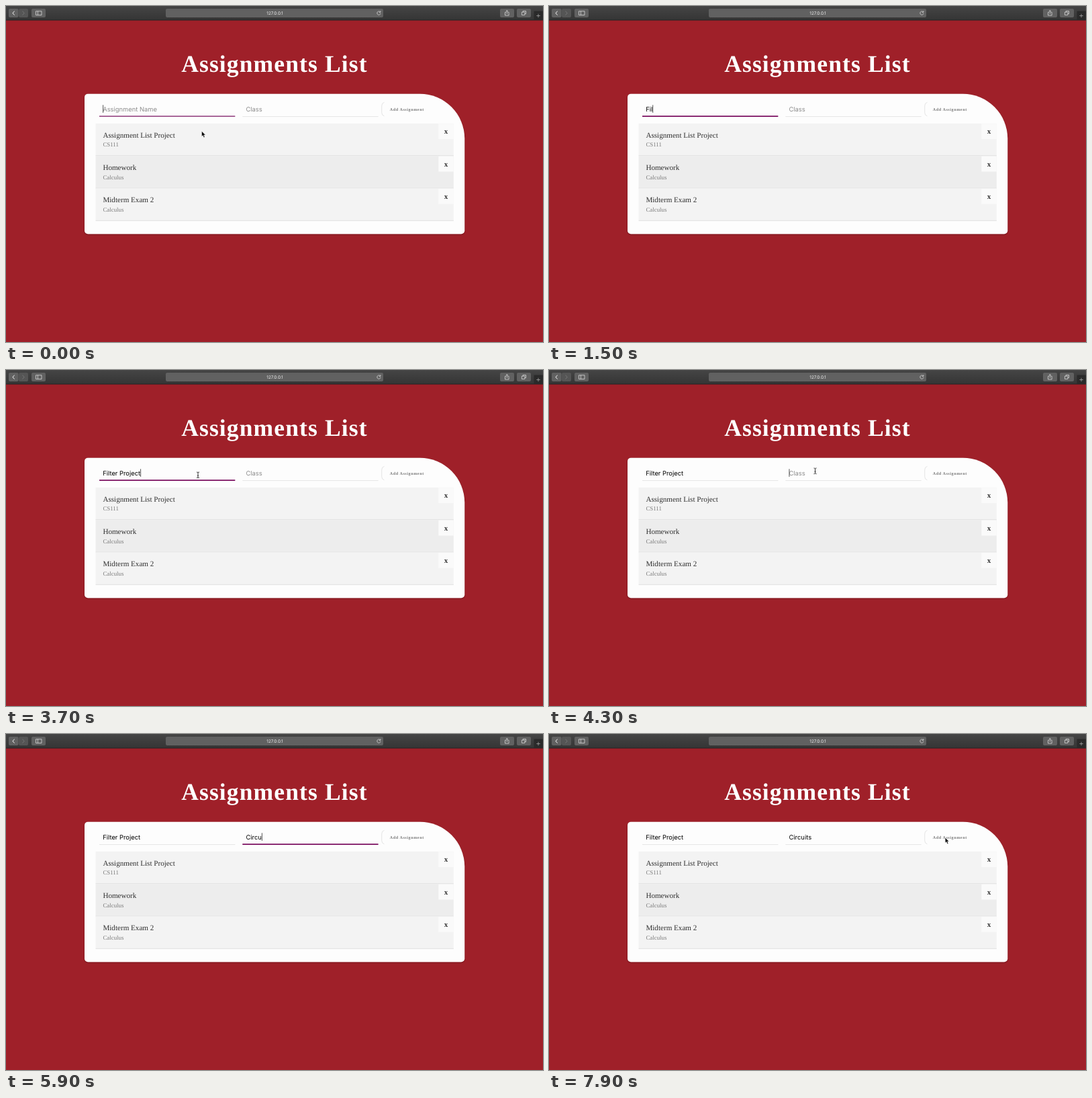
Recreate the animation shown at these times as an HTML page. Size 800 by 500 pixels, loop 8000 ms.

```html
<!DOCTYPE html>
<html lang="en">
<head>
<meta charset="utf-8">
<title>Assignments List</title>
<style>
  html, body { margin: 0; width: 100%; height: 100%; overflow: hidden; background: #9f2029; }
  svg { display: block; width: 800px; height: 500px; }
  text { font-family: "Liberation Serif", serif; text-rendering: geometricPrecision; white-space: pre; }
  .title { font-size: 35.56px; font-weight: bold; letter-spacing: 1.11px; fill: #fff; }
  .name { font-size: 11.11px; fill: #303030; }
  .class { font-size: 8.89px; fill: #7c7c7c; }
  .remove { font-size: 11.11px; font-weight: bold; fill: #333; text-anchor: middle; }
  .add { font-size: 6.11px; font-weight: bold; letter-spacing: .58px; fill: #777; }
  .input { font-family: Inter, sans-serif; font-size: 9.38px; }
  .hint { fill: #8c8c8c; }
  .url { font-family: Inter, sans-serif; font-size: 6.4px; fill: #f0f0f0; text-anchor: middle; }
  .glyph { fill: none; stroke: #d8d8d8; stroke-width: .8; }
</style>
</head>
<body>
<svg viewBox="0 0 800 500">
  <defs>
    <linearGradient id="bar" x2="0" y2="1">
      <stop stop-color="#454545"/><stop offset="1" stop-color="#353535"/>
    </linearGradient>
    <filter id="shadow" x="-5%" y="-5%" width="110%" height="115%">
      <feDropShadow dx="0" dy="1" stdDeviation="1.2" flood-opacity=".3"/>
    </filter>
  </defs>

  <rect width="800" height="500" fill="#9f2029"/>

  <!-- Browser toolbar -->
  <rect width="800" height="21" fill="url(#bar)"/>
  <rect y="20.5" width="800" height="1" fill="#242424"/>
  <g fill="#616161">
    <rect x="4" y="4" width="14.5" height="13" rx="2"/>
    <rect x="19" y="4" width="14" height="13" rx="2" fill="#555"/>
    <rect x="38" y="4" width="21" height="13" rx="2"/>
    <rect x="238" y="4" width="324" height="13" rx="2.2"/>
    <rect x="736" y="4" width="21" height="13" rx="2"/>
    <rect x="761" y="4" width="21" height="13" rx="2"/>
  </g>
  <rect x="786.5" y="7.5" width="13.5" height="13.5" fill="#2a2a2a"/>
  <g class="glyph">
    <path d="M12.7 7.8L9.8 10.6l2.9 2.8" stroke="#fff" stroke-width="1"/>
    <path d="M24.4 7.8l2.9 2.8-2.9 2.8" stroke="#808080"/>
    <path d="M44.5 7.7h8.5v5.8h-8.5zM47.4 7.7v5.8"/>
    <path d="M557.6 9.1A2.6 2.6 0 1 0 558 11M557.9 7.2v2.2h-2.2"/>
    <path d="M745 9.3h-1.5v4.7h5.6V9.3h-1.5M746.3 11.8V6.7M744.7 8.1l1.6-1.6 1.6 1.6"/>
    <path d="M768.4 9.2h4.4v4.2h-4.4zM770 9V7.5h4.5v4.2h-1.5"/>
    <path d="M790.3 14.5h5.4M793 11.8v5.4" stroke="#a5a5a5"/>
  </g>
  <text class="url" x="400.5" y="13.2">127.0.0.1</text>

  <text class="title" x="261.2" y="98">Assignments List</text>

  <path d="M122 130.7H616.5A66.7 66.7 0 0 1 683.2 197.4V334.3a5 5 0 0 1-5 5H122a5 5 0 0 1-5-5V135.7a5 5 0 0 1 5-5z"
        fill="#fdfdfd" filter="url(#shadow)"/>
  <path d="M563.5 143.3q-3.8 1-3.8 5.5v9.500q0 4.500 3.800 5.500" fill="none" stroke="#dedede" stroke-width=".8"/>
  <text class="add" x="571.7" y="155.600">Add Assignment</text>
  <g id="rows"></g>
  <g id="fields"></g>

  <path id="arrow" d="M0 0v7.900l1.800-1.700 1.400 3.200 1.500-.7-1.400-3h2.500z" fill="#0a0a0a" stroke="#fff" stroke-width=".5"/>
  <path id="beam" d="M-2-4.300q1.600 0 2 .8q.4-.8 2-.8M0-3.700V3.700M-2 4.300q1.600 0 2-.8q.4.800 2 .8M-1 .9h2"
        fill="none" stroke="#222" stroke-width=".9"/>
</svg>
<script>
const LOOP = 8000, STEP = 100;
const $ = id => document.getElementById(id);
const clamp = v => Math.max(0, Math.min(1, v));

const assignments = [["Assignment List Project", "CS111"], ["Homework", "Calculus"], ["Midterm Exam 2", "Calculus"]];
$("rows").innerHTML = assignments.map(([name, course], i) => `
  <g transform="translate(0 ${174.9 + i * 48.3})">
    <rect x="133.500" width="533.300" height="48.300" fill="${i % 2 ? "#ededed" : "#f3f3f3"}"/>
    <rect x="133.500" y="47.400" width="533.300" height=".8" fill="#dedede"/>
    <rect x="644.300" y=".4" width="22.500" height="22.800" fill="#fafafa"/>
    <text class="name" x="144.400" y="20.700">${name}</text>
    <text class="class" x="144.400" y="34.600">${course}</text>
    <text class="remove" x="655.500" y="15.600">x</text>
  </g>`).join("");

// keys: time of each keystroke; focus/blur/glow: focus span and underline fade
const fields = [
  { x: 139, hint: "Assignment Name", text: "Filter Project", focus: 0, blur: 4200, glow: [-900, 400], icon: 0,
    keys: [600, 1200, 1500, 1600, 1800, 2000, 2100, 2400, 2800, 2900, 3100, 3200, 3400, 3600] },
  { x: 352.3, hint: "Class", text: "Circuits", focus: 4200, blur: 7700, glow: [4300, 4600], icon: 4400,
    keys: [4900, 5200, 5400, 5700, 5900, 6000, 6100, 6400], blink: [6900, 7400] }
];
$("fields").innerHTML = fields.map(f => `
  <g transform="translate(${f.x} 0)">
    <rect y="164" width="202.300" height=".8" fill="#e2e2e2"/>
    <rect class="line" y="163.200" width="202.300" height="1.800" fill="#7f1765"/>
    <text class="input hint" x="5.200" y="156.700">${f.hint}</text>
    <text class="input typed" x="5.200" y="156.700"></text>
    <rect class="caret" y="147.300" width=".9" height="11.600" fill="#444"/>
    <g class="icon" fill="none" stroke="#222" stroke-width=".9">
      <circle cx="186.900" cy="153.100" r="3.200"/>
      <circle cx="186.900" cy="152" r=".8" fill="#222"/>
      <path d="M186.900 152.500v2.300M185.400 155h3M192 152.300l1.800 1.700 1.800-1.700"/>
    </g>
  </g>`).join("");

fields.forEach((f, i) => {
  for (const part of ["line", "hint", "typed", "caret", "icon"])
    f[part] = $("fields").children[i].querySelector("." + part);
});

// Each pointer path: [time, x, y] points; hidden from the end time on
const paths = [
  { end: 600, points: [[0, 291.500, 186.300], [100, 291, 184], [200, 289, 174], [300, 287, 161], [400, 286, 156.300]] },
  { end: 4900, points: [[3700, 286, 156.300], [3800, 296, 156], [4000, 358, 153], [4200, 394, 150.500], [4300, 396.500, 150.300]] },
  { end: LOOP, points: [[7100, 396.500, 150.300], [7300, 436, 152], [7500, 515, 157], [7700, 583, 158], [7900, 590.200, 154.200]] }
];

function pointerAt(t) {
  const path = paths.find(p => t >= p.points[0][0] && t < p.end);
  if (!path) return null;
  const next = path.points.findIndex(p => p[0] > t);
  if (next < 0) return path.points.at(-1).slice(1);
  const [a, b] = [path.points[next - 1], path.points[next]];
  const k = (t - a[0]) / (b[0] - a[0]);
  return [a[1] + (b[1] - a[1]) * k, a[2] + (b[2] - a[2]) * k];
}

const show = (el, on) => el.style.display = on ? "" : "none";

function drawField(f, t) {
  const focused = t >= f.focus && t < f.blur;
  const typed = f.text.slice(0, f.keys.filter(k => k <= t).length);
  const blinkedOff = f.blink && t >= f.blink[0] && t < f.blink[1];
  f.typed.textContent = typed;
  f.caret.setAttribute("x", 5.2 + (typed ? f.typed.getComputedTextLength() : 0));
  f.line.style.opacity = focused ? clamp((t - f.glow[0]) / (f.glow[1] - f.glow[0])) : 0;
  show(f.hint, !typed);
  show(f.caret, focused && !blinkedOff);
  show(f.icon, focused && t >= f.icon);
}

function drawPointer(t) {
  const at = pointerAt(t);
  const overField = at && at[1] < 166 && fields.some(f => at[0] >= f.x && at[0] <= f.x + 202.3);
  show($("arrow"), at && !overField);
  show($("beam"), overField);
  if (at) for (const id of ["arrow", "beam"]) $(id).setAttribute("transform", `translate(${at})`);
}

const start = performance.now();
function frame() {
  const t = Math.floor((performance.now() - start) % LOOP / STEP) * STEP;
  fields.forEach(f => drawField(f, t));
  drawPointer(t);
  requestAnimationFrame(frame);
}
frame();
</script>
</body>
</html>
```
